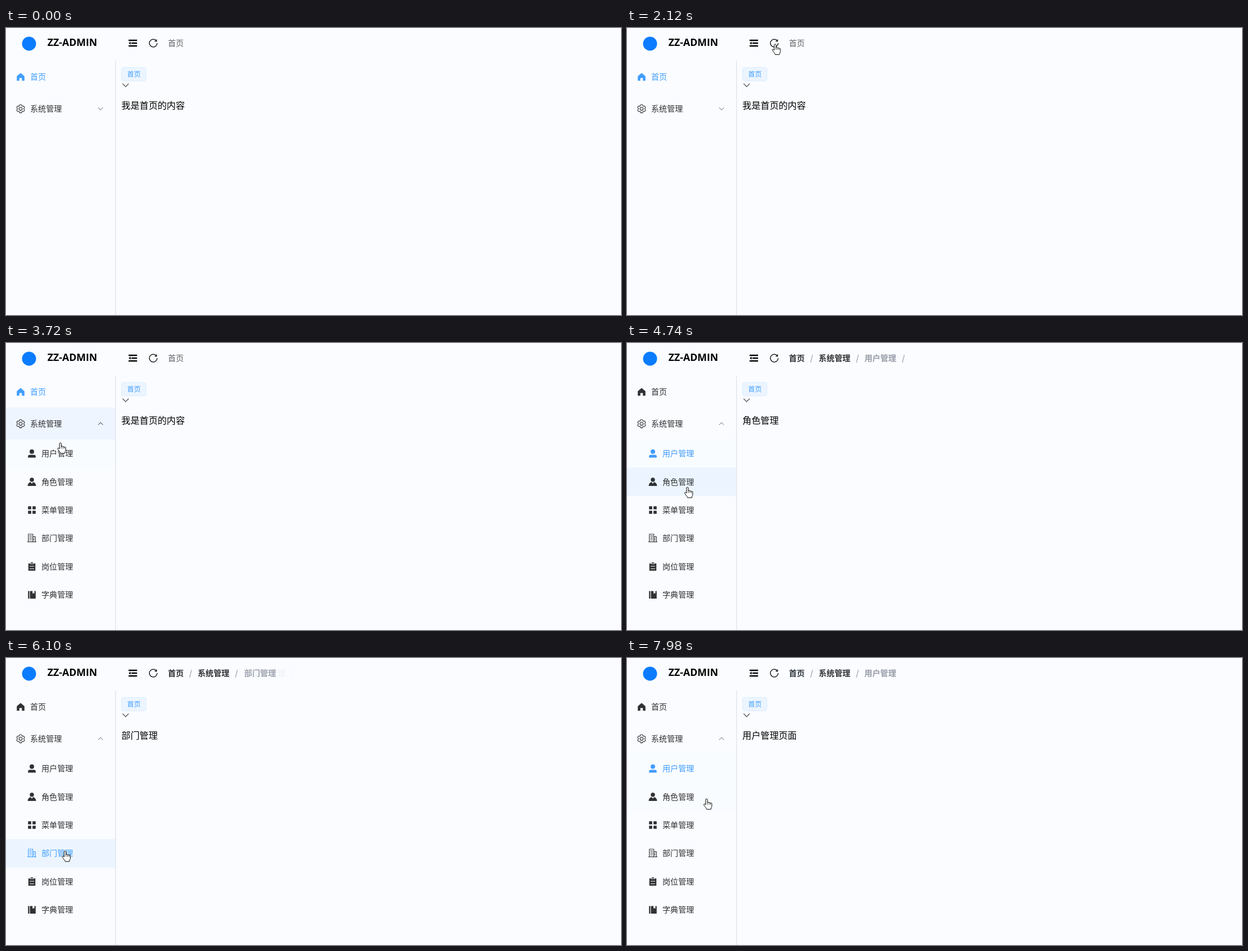
An HTML page that plays this animation: 1094 px wide and 512 px high, repeating every 8 s.

```html
<!DOCTYPE html>
<html lang="zh">
<head>
<meta charset="utf-8">
<title>ZZ-ADMIN</title>
<style>
  html, body { margin: 0; width: 100%; height: 100%; overflow: hidden; background: #fafcff; }
  svg { display: block; width: 100%; height: 100%; }
  text { font: 14.12px "Noto Sans CJK SC", "Noto Sans CJK", sans-serif; fill: currentColor; }
  .bold text { font-weight: 700; }
  .bold .slash { fill: #a8abb2; text-anchor: middle; }
  .tail { color: #979ca8; }
  .line { fill: none; stroke: currentColor; }
  #brand { font: 700 17.7px "Open Sans", sans-serif; }
  #content { font-size: 16.13px; }
  #tag { font-size: 12.1px; fill: #409eff; }
</style>
</head>
<body>
<svg viewBox="0 0 1094 512">
  <defs><clipPath id="fold"><rect id="foldBox" y="172" width="194" height="0"/></clipPath></defs>
  <rect width="1094" height="512" fill="#fafcff"/>
  <g id="menu"></g>
  <g id="submenu" clip-path="url(#fold)"></g>
  <path id="caret" class="line" color="#606266" d="M-4.3-2.1 0 2.2 4.3-2.1"/>
  <path d="M194.8 58V512" stroke="#dcdfe6" stroke-width="1.2"/>

  <circle cx="41" cy="28" r="12.5" fill="#0b7cff"/>
  <text id="brand" x="73.8" y="32.4">ZZ-ADMIN</text>
  <path transform="translate(225.6 27) scale(.0197) translate(-512 -512)"
    d="M128 192H896V320H128zM384 448H896V576H384zM128 704H896V832H128zM320 384 128 512 320 640z"/>
  <path class="line" stroke-width="1.3" d="M268.9 27A6.9 6.9 0 1 1 266.9 22.1M267.8 20.4V23.5H264.6"/>

  <text id="homeOnly" x="288" y="31.8" color="#606266">首页</text>
  <g id="crumbs" class="bold">
    <g id="crumbHome"><text x="288" y="31.8">首页</text><text class="slash" x="328.5" y="31.8">/</text></g>
    <g id="crumbSystem"><text x="341" y="31.8">系统管理</text><text class="slash" x="410" y="31.8">/</text></g>
    <g id="crumbOld" class="tail"><text x="422.3" y="31.8"></text><text class="slash" x="491.5" y="31.8">/</text></g>
    <g id="crumbNew" class="tail"><text x="422.3" y="31.8"></text></g>
  </g>

  <rect x="205.7" y="70.5" width="43.2" height="23.6" rx="3.5" fill="#ecf5ff" stroke="#d9ecff"/>
  <text id="tag" x="215.4" y="87.2">首页</text>
  <path class="line" color="#606266" stroke-width="1.5" d="M207.4 99.2 212.8 104.7 218.2 99.2"/>
  <text id="content" x="205.3" y="144.4"></text>

  <g id="cursor" fill="#fff" stroke="#000" stroke-linejoin="round">
    <path id="arrow" d="M.5.5V16.5L4.2 13 6.7 18.7 9.2 17.6 6.7 12.1H11.8z"/>
    <g id="hand">
      <path d="M-1.6 11V1.8a1.6 1.6 0 0 1 3.2 0V7a1.5 1.5 0 0 1 2.9.4 1.5 1.5 0 0 1 2.6.7 1.3 1.3 0 0 1 2.3 1V13c0 2.2-1.5 3-1.7 6H.3C.1 17-2.7 14.6-4.7 11.4c-.9-1.7 1-2.7 2-1.6z"/>
      <path d="M1.6 7v3.5M4.5 7.5v3M7.1 8.2v2.5" stroke-width=".8"/>
    </g>
  </g>
</svg>
<script>
const $ = id => document.getElementById(id);
const LOOP = 8000;
const ROW = 57, SUB_ROW = 50.4, MENU_TOP = 58, SUB_TOP = 172;

// Icons are drawn in a 1024 unit square.
const solid = d => `<path d="${d}" fill="currentColor" fill-rule="evenodd"/>`;
const outline = d => `<path class="line" d="${d}" stroke-width="64" stroke-linejoin="round"/>`;
const head = (y, r) => `<circle cx="512" cy="${y}" r="${r}" fill="currentColor"/>`;
const polar = (r, deg) => {
  const a = deg * Math.PI / 180;
  return `${512 + r * Math.sin(a)} ${512 - r * Math.cos(a)}`;
};
const gear = [0, 60, 120, 180, 240, 300].map(a =>
  [polar(318, a - 27), polar(420, a - 11), polar(420, a + 11), polar(318, a + 27)].join(' ')).join(' ');
const tiles = [128, 576].map(x => [128, 576].map(y =>
  `<rect x="${x}" y="${y}" width="320" height="320" rx="32" fill="currentColor"/>`).join('')).join('');

const rows = [
  ['首页', solid('M512 128 128 448V896H384V640H640V896H896V448z')],
  ['系统管理', outline(`M${gear}z`) + '<circle class="line" cx="512" cy="512" r="160" stroke-width="64"/>'],
  ['用户管理', head(320, 224) + solid('M128 928V800a160 160 0 0 1 160-160H736a160 160 0 0 1 160 160V928z')],
  ['角色管理', head(304, 208) + solid('M96 928A416 416 0 0 1 395 529L512 704 629 529A416 416 0 0 1 928 928z')],
  ['菜单管理', tiles],
  ['部门管理', outline('M160 864V96H608V864M608 352H864V864M64 864H960M256 288H512M256 480H512M256 672H512M640 544H768M640 672H768')],
  ['岗位管理', solid('M704 192H864V928H160V192H320V256H704zM288 512H736V448H288zM288 768H736V704H288zM384 192V96H640V192z')],
  ['字典管理', solid('M576 128V416L672 320 768 416V128H896V896H320V128zM128 128H256V896H128z')]
].map(([label, icon], i) => {
  const sub = i > 1;
  const height = sub ? SUB_ROW : ROW;
  const top = sub ? SUB_TOP + (i - 2) * SUB_ROW : MENU_TOP + i * ROW;
  const x = sub ? 46 : 26, mid = top + height / 2 + (sub ? 0 : .6);
  const group = document.createElementNS('http://www.w3.org/2000/svg', 'g');
  group.innerHTML = `<rect y="${top}" width="194.2" height="${height}" fill="#ecf5ff"/>
    <g transform="translate(${x} ${mid}) scale(.0177) translate(-512 -512)">${icon}</g>
    <text x="${x + 17}" y="${mid + 5}">${label}</text>`;
  $(sub ? 'submenu' : 'menu').append(group);
  return { label, top, height, group, back: group.firstChild };
});

const MENU_OPEN = 3435;
const pages = [
  { at: -1000, row: 0, text: '我是首页的内容' },
  { at: 4085, row: 2, text: '用户管理页面' },
  { at: 4732, row: 3, text: '角色管理' },
  { at: 5285, row: 4, text: '菜单管理' },
  { at: 5770, row: 5, text: '部门管理' },
  { at: 7060, row: 2, text: '用户管理页面' }
];

// The pointer rests between glides; "bend" is the control point of a curved one.
const entry = { x: 625, y: 505 };
const glides = [
  { from: 140, to: 940, x: 209, y: 106, bend: { x: 650, y: 190 } },
  { from: 990, to: 1200, x: 168, y: 173 },
  { from: 1200, to: 1740, x: 261, y: 41 },
  { from: 1850, to: 2120, x: 263.5, y: 28.5 },
  { from: 2410, to: 2870, x: 102, y: 124 },
  { from: 3020, to: 3210, x: 92, y: 134 },
  { from: 3500, to: 3835, x: 98.5, y: 194 },
  { from: 4390, to: 4680, x: 107.5, y: 257 },
  { from: 4800, to: 5100, x: 103, y: 297 },
  { from: 5340, to: 5460, x: 105, y: 344 },
  { from: 6150, to: 6510, x: 301, y: 29 },
  { from: 6560, to: 6840, x: 361, y: 27 },
  { from: 7350, to: 7600, x: 302, y: 29 },
  { from: 7840, to: 7980, x: 141.5, y: 251 }
];

const clamp = k => Math.max(0, Math.min(1, k));
const mix = (a, b, k) => a + (b - a) * k;
const smooth = k => k * k * (3 - 2 * k);

// Same curve as the CSS "ease" keyword.
function ease(k) {
  k = clamp(k);
  if (k === 0 || k === 1) return k;
  let lo = 0, hi = 1, s;
  for (let i = 0; i < 16; i++) {
    s = (lo + hi) / 2;
    if (.75 * s * (1 - s) + s ** 3 < k) lo = s; else hi = s;
  }
  return .3 * s * (1 - s) ** 2 + 3 * s * s * (1 - s) + s ** 3;
}

function pointAt(t) {
  const i = Math.max(0, glides.findLastIndex(g => g.from <= t));
  const start = glides[i - 1] ?? entry, end = glides[i];
  const linear = clamp((t - end.from) / (end.to - end.from));
  if (!end.bend) {
    const k = smooth(linear);
    return { x: mix(start.x, end.x, k), y: mix(start.y, end.y, k) };
  }
  const curve = axis => mix(mix(start[axis], end.bend[axis], linear), mix(end.bend[axis], end[axis], linear), linear);
  return { x: curve('x'), y: curve('y') };
}

// What the pointer can click at this time: a row index, a named link or null.
function targetAt(t) {
  const { x, y } = pointAt(t);
  if (x < 194) {
    const i = rows.findIndex(r => y >= r.top && y < r.top + r.height);
    return i < 0 || i > 1 && t < MENU_OPEN ? null : i;
  }
  if (y > 37) return null;
  if (x > 253 && x < 272) return 'refresh';
  if (t < pages[1].at) return null;
  if (x > 287 && x < 317) return 'home';
  return x > 340 && x < 399 ? 'system' : null;
}

// Eased hover strength, from the pointer's recent past.
function hover(t, target, fade) {
  const steps = 15;
  let sum = 0;
  for (let i = 0; i < steps; i++) {
    if (targetAt(t - fade * i / steps) === target) sum += ease((i + 1) / steps) - ease(i / steps);
  }
  return sum;
}

const active = (t, row) => clamp(pages.reduce((sum, page, i) => {
  if (page.row !== row) return sum;
  const end = pages[i + 1]?.at ?? 2 * LOOP;
  return sum + ease((t - page.at) / 300) - ease((t - end) / 300);
}, 0));
const tint = k => `color-mix(in srgb, #409eff ${k * 100}%, #303133)`;

function show(el, visible) { el.style.display = visible ? '' : 'none'; }

function slide(el, shift, opacity) {
  el.setAttribute('transform', `translate(${shift} 0)`);
  el.setAttribute('opacity', opacity);
}

function drawCrumbs(t, index) {
  show($('homeOnly'), index === 0);
  show($('crumbs'), index > 0);
  if (!index) return;
  const k = ease((t - pages[index].at) / 500);
  const entering = index === 1 ? k : 1;
  slide($('crumbSystem'), 20 * (1 - entering), entering);
  slide($('crumbNew'), 20 * (1 - k), k);
  slide($('crumbOld'), 20 * k, 1 - k);
  show($('crumbOld'), index > 1 && k < 1);
  $('crumbNew').firstChild.textContent = rows[pages[index].row].label;
  $('crumbOld').firstChild.textContent = rows[pages[index - 1].row].label;
  $('crumbHome').style.color = tint(hover(t, 'home', 200));
  $('crumbSystem').style.color = tint(hover(t, 'system', 200));
}

function draw(t) {
  const index = pages.findLastIndex(p => p.at <= t);
  $('content').textContent = pages[index].text;
  drawCrumbs(t, index);

  rows.forEach((row, i) => {
    row.group.style.color = tint(active(t, i));
    row.back.setAttribute('opacity', hover(t, i, 300));
  });
  const open = ease((t - MENU_OPEN) / 300);
  $('foldBox').setAttribute('height', 6 * SUB_ROW * open);
  $('caret').setAttribute('transform', `translate(168.2 144) rotate(${180 * open})`);

  const { x, y } = pointAt(t);
  const link = targetAt(t) !== null;
  show($('cursor'), t >= glides[0].from);
  show($('hand'), link);
  show($('arrow'), !link);
  $('cursor').setAttribute('transform', `translate(${x} ${y})`);
}

const begin = performance.now();
function tick() {
  draw((performance.now() - begin) % LOOP);
  requestAnimationFrame(tick);
}
tick();
</script>
</body>
</html>
```
